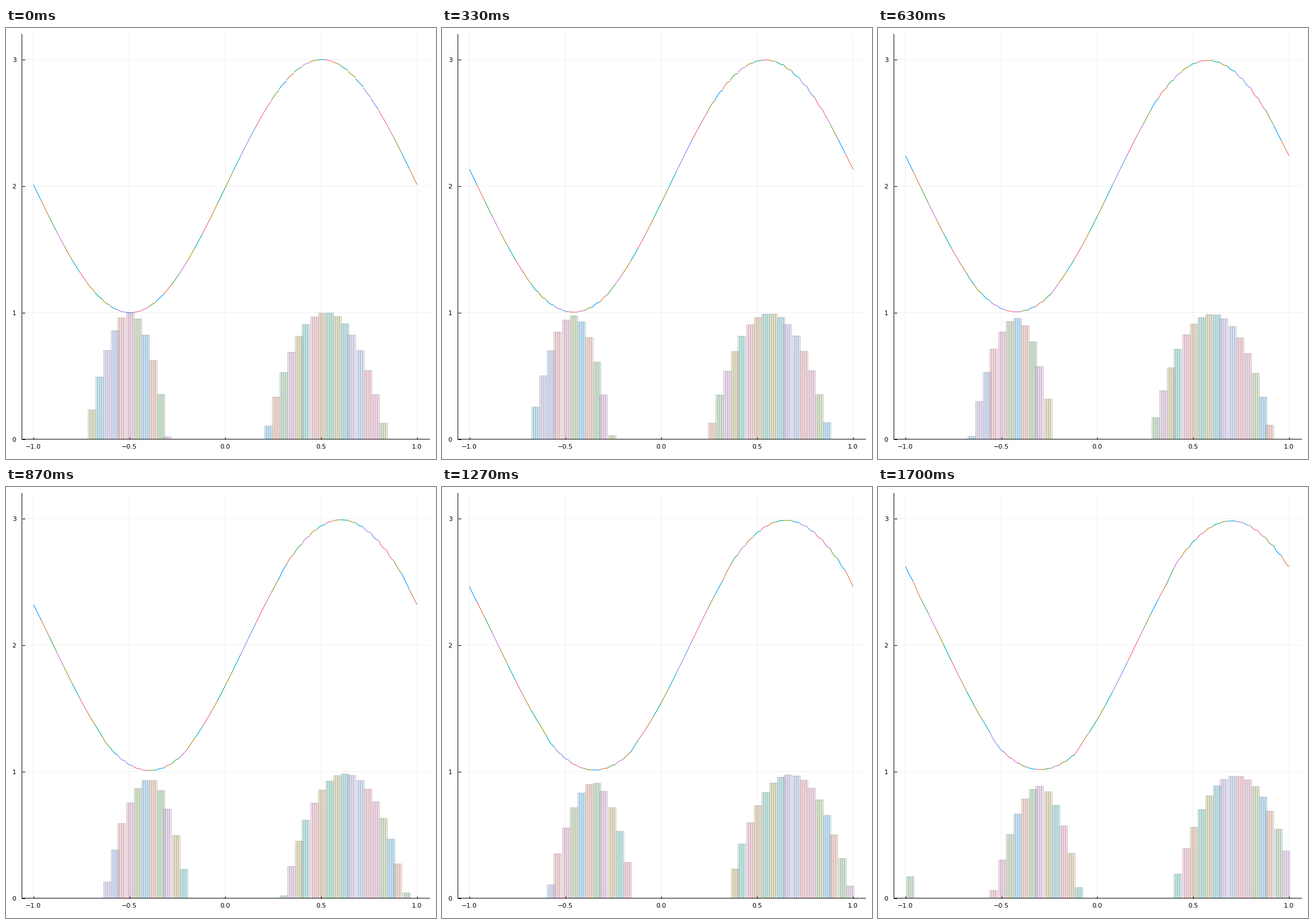
These frames come from a looping animation (748 px wide and 749 px high, 1.73 s). A matplotlib script:

```python
import numpy as np
import matplotlib.pyplot as plt
from matplotlib.animation import FuncAnimation
from matplotlib.collections import LineCollection, PolyCollection
from matplotlib.colors import to_rgba

W, H, DPI = 748, 749, 64
PX = 72 / DPI
TICK_MS, TICKS = 10, 173
STATES, T_END = 52, 0.2
STEP = T_END / STATES

PALETTE = ("#009AFA #E36F47 #3EA44E #C371D2 #AC8E18 #00AAAE #ED5E93 #C68225 "
           "#00A98D #8E971E #00A9CC #9B7FE9 #618DF6 #F06073 #DD65B6 #6C9F33").split()

# Mesh: 50 elements with three Gauss-Lobatto nodes each
K, DX = 50, 0.04
J = DX / 2
LEFT = -1 + DX * np.arange(K)
MID = LEFT + J
NODES = np.array([-1.0, 0.0, 1.0])
WEIGHTS = np.array([1, 4, 1]) / 3
DIFF = np.array([[-1.5, 2, -0.5], [-0.5, 0, 0.5], [0.5, -2, 1.5]])
R = np.linspace(-1, 1, 5)
TO_PLOT = np.vander(R, 3) @ np.linalg.inv(np.vander(NODES, 3))


def arch(t, centre, left, right, power, decay, growth):
    """Bump that travels with the wave, sinking and widening over time."""
    d = (MID - centre - t + 1) % 2 - 1
    z = np.abs(d) / (np.where(d < 0, left, right) * (1 + growth * t))
    return (1 - decay * t) * (1 - z ** power)


def blending(t):
    crest = arch(t, 0.518, 0.318, 0.318, 2.08, 0.175, 0.21)
    trough = arch(t, -0.503, 0.231, 0.201, 1.87, 0.575, 0.33)
    return np.clip(np.maximum(crest, trough), 0, 1)


def rhs(u, t):
    inflow = np.roll(u[:, 2], 1)
    dg = -u @ DIFF.T / J
    dg[:, 0] += (inflow - u[:, 0]) / (WEIGHTS[0] * J)
    fv = -np.diff(np.column_stack([inflow, u]), axis=1) / (WEIGHTS * J)
    a = blending(t)[:, None]
    return (1 - a) * dg + a * fv


def solve(substeps=4):
    """Advect the sine wave with a blended DG / finite volume scheme."""
    u = 2 + np.sin(np.pi * (MID[:, None] + J * NODES))
    dt, t, states = STEP / substeps, 0.0, []
    for _ in range(STATES):
        for _ in range(substeps):
            u1 = u + dt * rhs(u, t)
            u2 = 0.75 * u + 0.25 * (u1 + dt * rhs(u1, t + dt))
            u = u / 3 + 2 / 3 * (u2 + dt * rhs(u2, t + dt / 2))
            t += dt
        states.append((u @ TO_PLOT.T, blending(t)))
    return states


states = solve()
X_PLOT = MID[:, None] + J * R

# Four thin bars per element, most elements offset by half a bar
BAR = DX / 4
BAR_LEFT = LEFT + np.where(np.arange(K) % 6 == 5, 0, BAR / 2)


def bar_shapes(alpha):
    shapes, faces = [], []
    for k in np.flatnonzero(alpha > 0.001):
        for x in BAR_LEFT[k] + BAR * np.arange(4):
            shapes.append([(x, 0), (x, alpha[k]), (x + BAR, alpha[k]), (x + BAR, 0)])
            faces.append(to_rgba(PALETTE[(K + k) % 16], 0.2))
    return shapes, faces


plt.rcParams["font.family"] = "DejaVu Sans"
fig = plt.figure(figsize=(W / DPI, H / DPI), dpi=DPI, facecolor="white")
x0, x1, y0, y1 = 27.7, 736.7, 714.6, 10.9
ax = fig.add_axes([x0 / W, 1 - y0 / H, (x1 - x0) / W, (y0 - y1) / H])
ax.set_xlim(-1.06, 1.065)
ax.set_ylim(0, 3.2)
ax.set_xticks([-1, -0.5, 0, 0.5, 1])
ax.set_yticks([0, 1, 2, 3])
ax.set_axisbelow(True)
ax.grid(color="black", alpha=0.1, linewidth=0.6 * PX, snap=False)
ax.spines[["top", "right"]].set_visible(False)
for side in ("left", "bottom"):
    ax.spines[side].set_linewidth(PX)
    ax.spines[side].set_snap(False)
ax.tick_params(direction="in", length=4.5 * PX, width=PX, labelsize=11.1 * PX)
ax.tick_params(axis="x", pad=8 * PX)
ax.tick_params(axis="y", pad=10 * PX)

curve = LineCollection([], colors=[PALETTE[k % 16] for k in range(K)],
                       linewidths=1.1 * PX, zorder=3)
bars = PolyCollection([], edgecolors=(0, 0, 0, 0.2), linewidths=0.8 * PX, zorder=3)
bars.set_snap(False)
ax.add_collection(curve, autolim=False)
ax.add_collection(bars, autolim=False)


def update(tick):
    # 30 states per second, each starting on the nearest tick
    u, alpha = states[(3 * tick + 1) // 10]
    curve.set_segments(np.stack([X_PLOT, u], axis=-1))
    shapes, faces = bar_shapes(alpha)
    bars.set_verts(shapes)
    bars.set_facecolor(faces)
    return curve, bars


anim = FuncAnimation(fig, update, frames=TICKS, interval=TICK_MS,
                     repeat=True, repeat_delay=0, blit=False)
plt.show()
```
